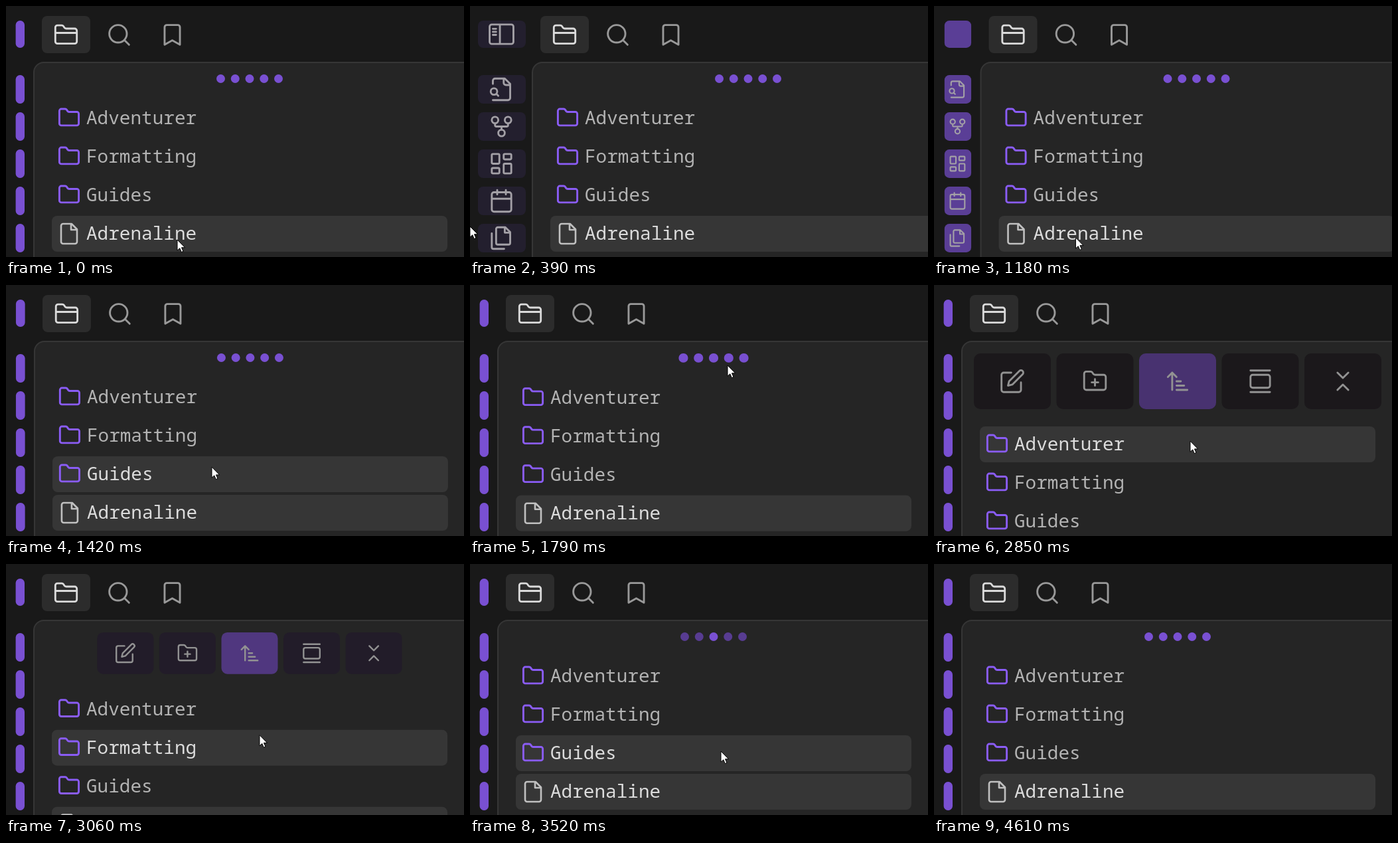
An HTML page with a canvas for the animation above (4670 ms loop, 690 px wide and 378 px high).

```html
<!DOCTYPE html>
<html lang="en">
<head>
<meta charset="utf-8">
<style>
html, body { margin: 0; width: 100%; height: 100%; overflow: hidden; background: #191919; }
canvas { display: block; width: 690px; height: 378px; }
</style>
</head>
<body>
<canvas id="stage" width="690" height="378"></canvas>
<script>
const ctx = document.getElementById('stage').getContext('2d');
const LOOP = 4670;
const PURPLE = [121, 80, 210], SIDE_DARK = [35, 31, 46], BAR_DARK = [27, 24, 27], BAR_HOVER = [72, 50, 112];

// Icons on a 24-unit grid
const box = (x, y, w, h, r = 1) =>
  `M${x + r} ${y}h${w - 2 * r}a${r} ${r} 0 0 1 ${r} ${r}v${h - 2 * r}a${r} ${r} 0 0 1 ${-r} ${r}` +
  `h${2 * r - w}a${r} ${r} 0 0 1 ${-r} ${-r}v${2 * r - h}a${r} ${r} 0 0 1 ${r} ${-r}z`;
const ring = (x, y, r) => `M${x - r} ${y}a${r} ${r} 0 1 0 ${2 * r} 0a${r} ${r} 0 1 0 ${-2 * r} 0`;
const folder = 'M4 20h16a2 2 0 0 0 2-2V8a2 2 0 0 0-2-2h-7.9a2 2 0 0 1-1.7-.9l-.8-1.2A2 2 0 0 0 7.9 3H4a2 2 0 0 0-2 2v13c0 1.1.9 2 2 2Z';
const icons = {
  folder,
  openFolder: folder + 'M2 10h20',
  file: 'M14.5 2H6a2 2 0 0 0-2 2v16a2 2 0 0 0 2 2h12a2 2 0 0 0 2-2V7.5zM14 2v6h6',
  search: ring(11, 11, 8) + 'M21 21l-4.3-4.3',
  bookmark: 'M19 21l-7-4-7 4V5a2 2 0 0 1 2-2h10a2 2 0 0 1 2 2z',
  panel: box(1, 3, 22, 18, 2) + 'M10.5 3v18M4 7h3M4 9.8h3M4 12.6h3',
  fileSearch: 'M4 22h14a2 2 0 0 0 2-2V7l-5-5H6a2 2 0 0 0-2 2v3M14 2v4a2 2 0 0 0 2 2h4' + ring(5, 14, 3) + 'M9 18l-1.5-1.5',
  fork: ring(12, 18, 3) + ring(6, 6, 3) + ring(18, 6, 3) + 'M18 9v2c0 .6-.4 1-1 1H7c-.6 0-1-.4-1-1V9M12 12v3',
  board: box(3, 3, 7, 9) + box(14, 3, 7, 5) + box(14, 12, 7, 9) + box(3, 16, 7, 5),
  calendar: box(3, 4, 18, 18, 2) + 'M16 2v4M8 2v4M3 10h18',
  files: 'M15.5 2H8.6A1.6 1.6 0 0 0 7 3.6v12.8A1.6 1.6 0 0 0 8.6 18h9.8a1.6 1.6 0 0 0 1.6-1.6V6.5z' +
    'M3 7.6v12.8A1.6 1.6 0 0 0 4.6 22h9.8M15 2v5h5',
  edit: 'M11 4H4a2 2 0 0 0-2 2v14a2 2 0 0 0 2 2h14a2 2 0 0 0 2-2v-7M18.5 2.5a2.1 2.1 0 0 1 3 3L12 15l-4 1 1-4z',
  addFolder: folder + 'M12 10v6M9 13h6',
  sort: 'M3 8l4-4 4 4M7 4v16M11 12h4M11 16h7M11 20h10',
  gallery: 'M3 2h18M3 22h18' + box(3, 6, 18, 12, 2),
  fold: 'M7 20l5-5 5 5M7 4l5 5 5-5'
};
for (const name in icons) icons[name] = new Path2D(icons[name]);
const pointer = new Path2D('M0 0V16.2L3.8 12.8 6.3 18.6 9 17.4 6.5 11.8H11.6Z');

const ribbon = ['panel', 'fileSearch', 'fork', 'board', 'calendar', 'files'];
const actions = ['edit', 'addFolder', 'sort', 'gallery', 'fold'];
const rows = ['Adventurer', 'Formatting', 'Guides', 'Adrenaline'];
// time, x, y
const path = [
  [0, 258, 352], [30, 258, 352], [130, 40, 340], [390, 0, 332], [700, 3, 325], [1000, 8, 342],
  [1180, 213, 349], [1320, 275, 330], [1600, 372, 175], [1790, 388, 121], [2150, 391, 138],
  [2500, 400, 155], [2750, 390, 168], [2850, 386, 235], [3270, 378, 280], [3520, 378, 282],
  [3860, 379, 283], [4250, 700, 300], [LOOP, 700, 300]
];

const clamp = v => Math.max(0, Math.min(1, v));
const mix = (a, b, k) => a + (b - a) * k;
const blend = (a, b, k) => `rgb(${a.map((v, i) => mix(v, b[i], k))})`;

// cubic-bezier(.25, .1, .25, 1)
function ease(x) {
  if (x <= 0 || x >= 1) return clamp(x);
  let lo = 0, hi = 1, s;
  for (let i = 0; i < 20; i++) {
    s = (lo + hi) / 2;
    if (.75 * s * (1 - s) + s ** 3 < x) lo = s; else hi = s;
  }
  return .3 * s * (1 - s) ** 2 + 3 * s * s * (1 - s) + s ** 3;
}

function cursorAt(t) {
  const i = path.findIndex(p => p[0] > t);
  const a = path[i - 1], b = path[i], k = (t - a[0]) / (b[0] - a[0]);
  return [mix(a[1], b[1], k), mix(a[2], b[2], k)];
}

function block(x, y, w, h, r, color) {
  ctx.fillStyle = color;
  ctx.beginPath();
  ctx.roundRect(x, y, w, h, r);
  ctx.fill();
}

function icon(name, x, y, scale, color, alpha = 1, weight = 1.75) {
  if (alpha <= 0) return;
  ctx.save();
  ctx.globalAlpha = alpha;
  ctx.translate(x, y);
  ctx.scale(scale, scale);
  ctx.translate(-12, -12);
  ctx.lineWidth = weight;
  ctx.lineCap = ctx.lineJoin = 'round';
  ctx.strokeStyle = color;
  ctx.stroke(icons[name]);
  ctx.restore();
}

function draw(t) {
  const ramp = (start, length) => ease((t - start) / length);
  const side = ramp(80, 310) - ramp(1065, 430);
  const sideDark = ramp(80, 330) - ramp(1065, 315);
  const bar = ramp(1784, 350) - ramp(2980, 400);
  const barDark = ramp(1784, 350) - clamp((t - 3000) / 800);
  const hoverDark = ramp(1784, 350) - ramp(3000, 450);
  const shift = 52 * side, drop = 71 * bar;
  const [cx, cy] = cursorAt(t);

  ctx.fillStyle = '#191919';
  ctx.fillRect(0, 0, 690, 378);

  // Ribbon
  ribbon.forEach((name, i) => {
    const y = i ? 48 + 56 * i : 22, h = i ? 43 : 41;
    const x = mix(21.3, 48, side), w = mix(13.4, 72, side ** 1.3);
    block(x - w / 2, y, w, h, 6.5 + 1.5 * side, blend(PURPLE, SIDE_DARK, sideDark));
    const alpha = i ? clamp(side * 3 - .5) : clamp(side * 4 - 3);
    icon(name, x - .5, y + h / 2, 1.63 * Math.sqrt(side), '#a3a0a6', alpha);
  });

  ctx.save();
  ctx.translate(shift, 0);

  // Tabs
  block(54, 15, 73, 56, 8, '#2c2c2c');
  icon('openFolder', 90.5, 43.7, 1.62, '#dadada');
  icon('search', 170.5, 43.5, 1.65, '#999');
  icon('bookmark', 250.5, 43.5, 1.65, '#999');

  // Panel
  block(42, 85, 800, 400, 15, '#252525');
  ctx.strokeStyle = '#363636';
  ctx.lineWidth = 2;
  ctx.stroke();

  // Actions
  actions.forEach((name, i) => {
    const x = 367 + (i - 2) * mix(21.75, 124.5, bar);
    const w = mix(13, 116, bar), h = 13 + drop;
    const color = i === 2 ? blend(PURPLE, BAR_HOVER, hoverDark) : blend(PURPLE, BAR_DARK, barDark);
    block(x - w / 2, 103, w, h, mix(6.5, 10, bar), color);
    icon(name, x, 103 + h / 2, 1.63 * Math.sqrt(bar), '#929292', clamp(bar * 3 - .5));
  });

  // File list
  ctx.font = '27.7px "Noto Sans Mono", "DejaVu Sans Mono", monospace';
  rows.forEach((label, i) => {
    const y = 142 + 58 * i + drop, active = i === 3;
    const hover = cx >= 69 + shift && cx < 665 + shift && cy >= y && cy < y + 54;
    if (active || hover) block(69, y, 596, 54, 8, '#363636');
    if (active) icon('file', 95, y + 27, 1.5, '#c0c0c0');
    else icon('folder', 95, y + 26.2, 1.46, '#8a5cf5', 1, 2);
    ctx.fillStyle = active || hover ? '#dcdcdc' : '#b3b3b3';
    ctx.fillText(label, 121, y + 36);
  });
  ctx.restore();

  ctx.save();
  ctx.translate(cx, cy);
  ctx.fillStyle = '#fff';
  ctx.strokeStyle = '#000';
  ctx.lineWidth = 1;
  ctx.fill(pointer);
  ctx.stroke(pointer);
  ctx.restore();
}

function tick() {
  draw(performance.now() % LOOP);
  requestAnimationFrame(tick);
}
tick();
</script>
</body>
</html>
```
